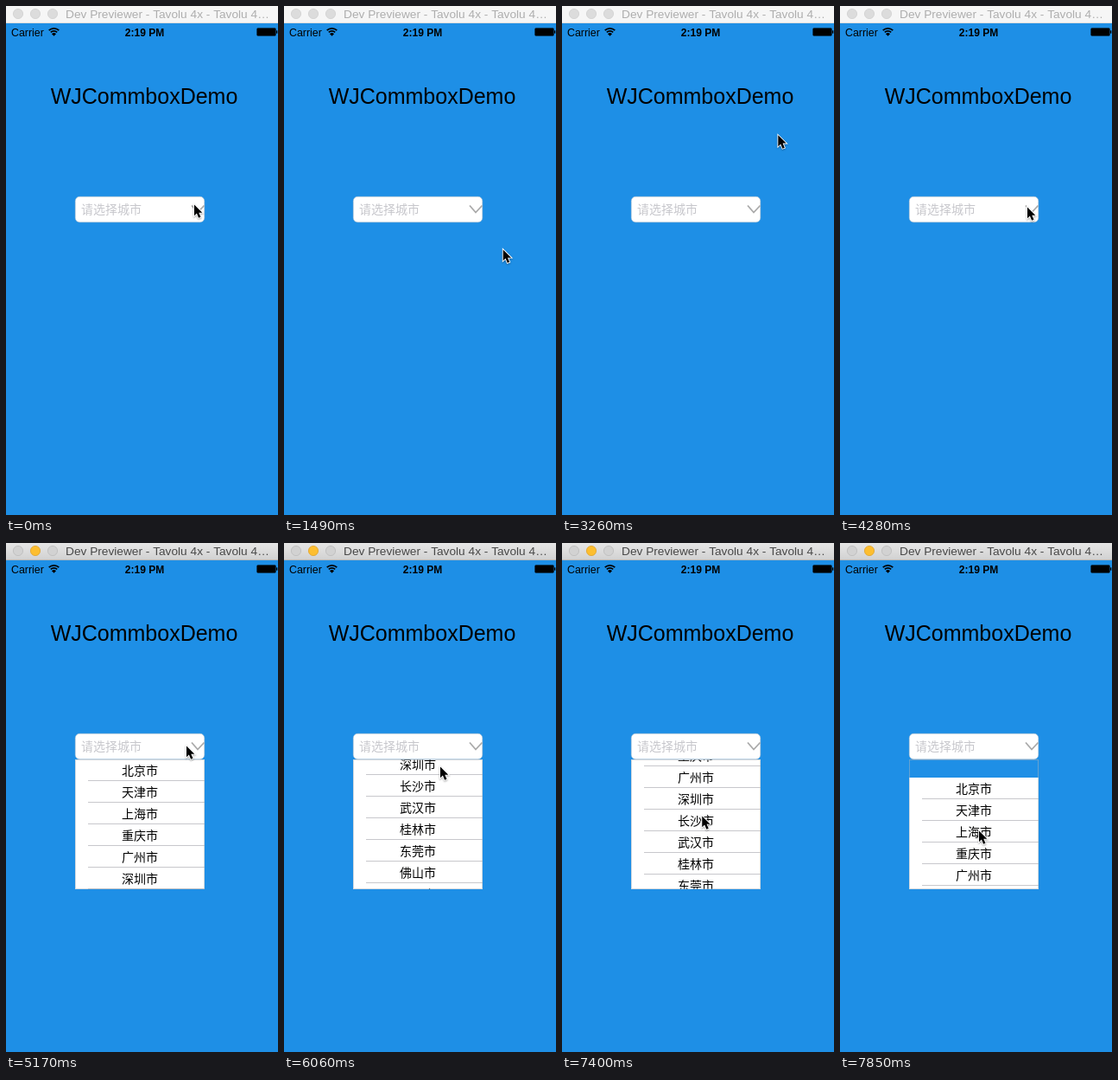
Write an HTML page with a canvas that moves like this. It is 315x588 px and loops after 8000 ms.

```html
<!DOCTYPE html>
<html lang="zh-CN">
<head>
<meta charset="utf-8">
<style>
html, body { margin: 0; width: 100%; height: 100%; overflow: hidden; }
canvas { display: block; }
</style>
</head>
<body>
<canvas id="stage" width="315" height="588"></canvas>
<script>
const c = document.getElementById('stage').getContext('2d');
const SANS = '"Liberation Sans", Arial, sans-serif';
const CJK = '"Noto Sans CJK SC", "Noto Sans CJK", sans-serif';
const BLUE = '#1e8fe6';
const LOOP = 8000, STEP = 148.15, LAST = 53;
const ACTIVE = 30, OPEN = 31, ROW = 25;
const cities = '北京 天津 上海 重庆 广州 深圳 长沙 武汉 桂林 东莞 佛山 邵阳 拉萨 郑州 苏州 太原'.split(' ');

const part = (s, from, to) => Math.min(1, Math.max(0, (s - from) / (to - from)));
const mix = (a, b, u) => a + (b - a) * u;
const smooth = u => u * u * (3 - 2 * u);

// Point on a Bézier curve of any degree
function curve(u, ...pts) {
  while (pts.length > 1)
    pts = pts.slice(1).map((p, i) => [mix(pts[i][0], p[0], u), mix(pts[i][1], p[1], u)]);
  return pts[0];
}

function pointer(s) {
  if (s < 6) return curve(part(s, 3, 5), [217, 228], [216, 231]);
  if (s < 9) return [221, 232];
  if (s < 17) return curve(part(s, 9, 16), [221, 232], [330, 430], [180, -35], [64, 93]);
  if (s < 27) return curve(part(s, 17, 26), [65, 108], [240, 100], [310, 160], [216, 231]);
  if (s < 35) return curve(part(s, 29, 35), [216, 231], [208, 233]);
  if (s < 41) return curve(part(s, 35, 41), [208, 233], [180, 257]);
  return curve(part(s, 41, 53), [180, 257], [160, 298], [160, 331]);
}

// Down past the last row, then back past the first
function scroll(s) {
  return s <= 46
    ? Math.round(266 * part(s, 35, 46) ** 1.156)
    : Math.round(mix(266, -21, smooth(part(s, 46, LAST))));
}

function rect(x, y, w, h, fill) {
  c.fillStyle = fill;
  c.fillRect(x, y, w, h);
}

function text(s, x, y, font, fill, align = 'left') {
  c.font = font;
  c.fillStyle = fill;
  c.textAlign = align;
  c.fillText(s, x, y);
}

function titleBar(active) {
  const g = c.createLinearGradient(0, 0, 0, 20);
  g.addColorStop(0, active ? '#e6e6e6' : '#f6f6f6');
  g.addColorStop(1, active ? '#d1d1d1' : '#f6f6f6');
  rect(0, 0, 315, 20, g);
  rect(0, 19, 315, 1, active ? '#b8b8b8' : '#dedede');
  for (const x of [14, 34, 54]) {
    const lit = active && x === 34;
    c.beginPath();
    c.arc(x, 9, 5.6, 0, 7);
    c.fillStyle = lit ? '#fdbe2f' : active ? '#d2d2d2' : '#dcdcdc';
    c.fill();
    c.lineWidth = 0.8;
    c.strokeStyle = lit ? '#e0a32a' : active ? '#bcbcbc' : '#d0d0d0';
    c.stroke();
  }
  text('Dev Previewer - Tavolu 4x - Tavolu 4…', 69, 14, '13.7px ' + SANS, active ? '#484848' : '#aeaeae');
}

function statusBar() {
  text('Carrier', 6, 35, '12.4px ' + SANS, '#000');
  text('2:19 PM', 160.5, 35, 'bold 12px ' + SANS, '#000', 'center');
  c.strokeStyle = c.fillStyle = '#000';
  c.lineWidth = 1.7;
  for (const r of [8.2, 5.2]) {
    c.beginPath();
    c.arc(55.5, 34, r, -Math.PI * 0.75, -Math.PI * 0.25);
    c.stroke();
  }
  c.beginPath();
  c.moveTo(55.5, 34.8);
  c.arc(55.5, 34.8, 3.6, -Math.PI * 0.75, -Math.PI * 0.25);
  c.fill();
  c.lineWidth = 0.6;
  c.beginPath();
  c.roundRect(290.5, 25.5, 22, 9, 1.5);
  c.stroke();
  rect(291, 26, 21, 8, '#000');
  rect(313, 28.3, 1.3, 3.4, '#000');
}

function list(offset) {
  c.save();
  c.beginPath();
  c.rect(80, 250, 150, 150);
  c.clip();
  const top = 250 - offset;
  rect(80, top, 150, ROW * cities.length, '#fff');
  cities.forEach((city, i) => {
    const y = top + i * ROW;
    text(city + '市', 155, y + 17.5, '300 14px ' + CJK, '#000', 'center');
    rect(95, y + ROW - 1, 135, 1, '#c8c8cc');
  });
  c.restore();
  c.lineWidth = 1;
  c.strokeStyle = 'rgba(170,180,190,.5)';
  c.strokeRect(80.5, 250.5, 149, 149);
}

function field() {
  c.beginPath();
  c.roundRect(80.25, 220.25, 149.5, 29.5, 5);
  c.fillStyle = '#fff';
  c.fill();
  c.lineWidth = 0.5;
  c.strokeStyle = '#b4bcc4';
  c.stroke();
  text('请选择城市', 87, 239.5, '300 14px ' + CJK, '#c7c7cc');
  c.beginPath();
  c.moveTo(215, 230.5);
  c.lineTo(222, 238.5);
  c.lineTo(229.5, 230.5);
  c.lineWidth = 1.8;
  c.strokeStyle = '#aaa';
  c.stroke();
}

function arrow(x, y) {
  c.save();
  c.translate(x, y);
  c.shadowColor = 'rgba(0,0,0,.35)';
  c.shadowBlur = 2;
  c.shadowOffsetY = 1;
  const p = new Path2D('M1 1.5V14.3L3.9 11.6L6.1 16.8L8.5 15.8L6.3 10.7H10.3Z');
  c.lineWidth = 1.8;
  c.strokeStyle = '#fff';
  c.stroke(p);
  c.shadowColor = 'transparent';
  c.fillStyle = '#000';
  c.fill(p);
  c.restore();
}

function draw(now) {
  const step = Math.min(LAST, Math.floor((now % LOOP + 20) / STEP));
  rect(0, 0, 315, 588, BLUE);
  titleBar(step >= ACTIVE);
  statusBar();
  text('WJCommboxDemo', 160, 113, '25px ' + SANS, '#000', 'center');
  if (step >= OPEN) list(scroll(step));
  field();
  arrow(...pointer(step));
  requestAnimationFrame(draw);
}
requestAnimationFrame(draw);
</script>
</body>
</html>
```
